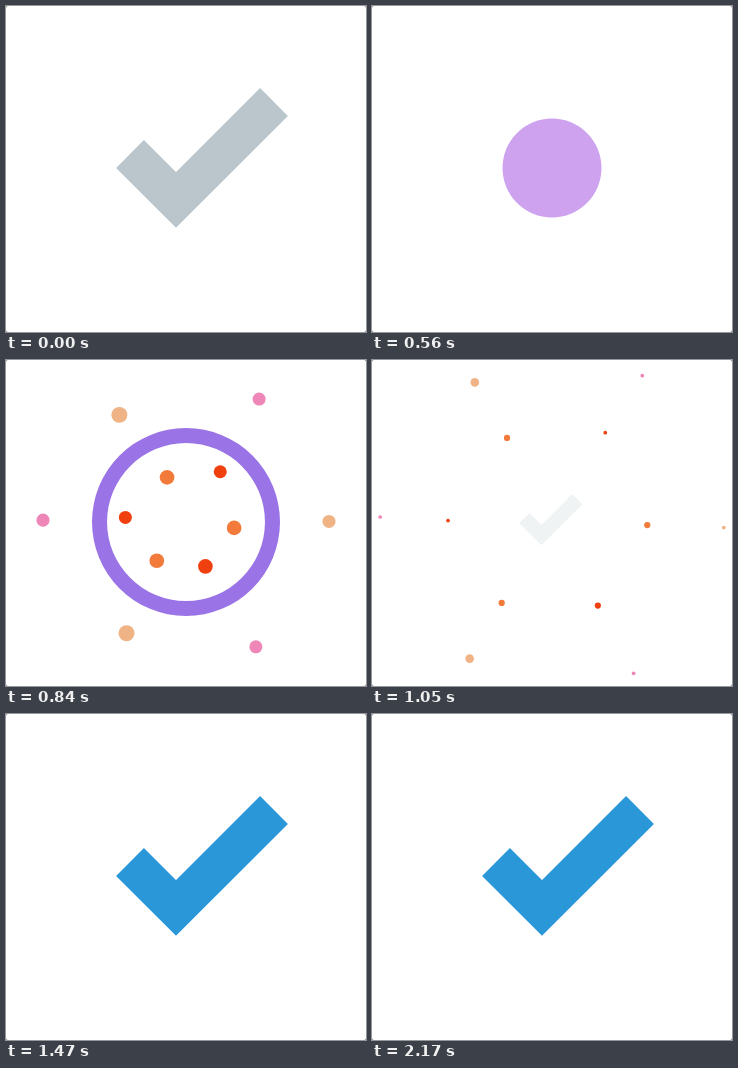
An HTML page with a canvas for the animation above (2240 ms loop, 360x326 px).

```html
<!DOCTYPE html>
<html lang="en">
<head>
<meta charset="utf-8">
<title>Check burst</title>
<style>
  html, body { margin: 0; width: 360px; height: 326px; overflow: hidden; background: #777; }
  canvas { display: block; background: #fff; border-radius: 2px; }
</style>
</head>
<body>
<canvas id="stage" width="360" height="326"></canvas>
<script>
const ctx = document.getElementById('stage').getContext('2d');
const LOOP = 2240, STEP = 70;
const CX = 180, CY = 162;
const CHECK_LENGTH = 203.5;
const GREY = '#bac6cc', PALE = '#eff3f4', BLUE = '#2a97d9';

// Four triplets of dots; near ones start inside the ring, far ones at its rim.
// drift is the sideways offset of each flight line; delays are per dot.
const near = { from: 5.5, span: 107 }, far = { from: 106, span: 71.6 };
const triplets = [
  { color: '#ee87b7', path: far, heading: 66.2, drift: -13.6, delays: [0, 0, 0] },
  { color: '#f0b385', path: far, heading: 12.2, drift: -31, delays: [0, 100, 100] },
  { color: '#f1400f', path: near, heading: -64.1, drift: 8.9, delays: [0, 50, 0] },
  { color: '#f27a3a', path: near, heading: -3.5, drift: 8.9, delays: [50, 50, 50] }
];

// Progress from 0 to 1 over a time span.
const progress = (t, start, span) => Math.min(1, Math.max(0, (t - start) / span));
const easeOut = (t, start, span, power = 2) => 1 - (1 - progress(t, start, span)) ** power;
const easeIn = (t, start, span, power) => progress(t, start, span) ** power;

function disc(x, y, r, color) {
  ctx.fillStyle = color;
  ctx.beginPath();
  ctx.arc(x, y, r, 0, Math.PI * 2);
  ctx.fill();
}

function check(color, scale, ox, oy, part = 1) {
  if (scale <= 0 || part <= 0) return;
  ctx.save();
  ctx.translate(ox, oy);
  ctx.scale(scale, scale);
  ctx.translate(-ox, -oy);
  ctx.strokeStyle = color;
  ctx.lineWidth = 39.4;
  if (part < 1) ctx.setLineDash([CHECK_LENGTH * part, CHECK_LENGTH * 2]);
  ctx.beginPath();
  ctx.moveTo(124, 148);
  ctx.lineTo(170, 194);
  ctx.lineTo(268, 96);
  ctx.stroke();
  ctx.restore();
}

function ring(t) {
  const outer = 97 * easeOut(t, 500, 200) - 4 * easeOut(t, 700, 280);
  const inner = 94 * easeOut(t, 630, 350);
  if (outer <= inner) return;
  const k = (t - 700) / 140;
  ctx.fillStyle = `rgb(${180 - 26 * k}, ${139 - 23 * k}, ${234 - 4 * k})`;
  ctx.beginPath();
  ctx.arc(CX, CY, outer, 0, Math.PI * 2);
  ctx.moveTo(CX + inner, CY);
  ctx.arc(CX, CY, inner, 0, Math.PI * 2, true);
  ctx.fill();
}

function burst(t) {
  for (const { color, path, heading, drift, delays } of triplets) {
    delays.forEach((delay, i) => {
      const age = t - delay;
      if (age < 700) return;
      const d = path.from + path.span * easeOut(age, 630, 490, 1.3);
      const a = (heading + 120 * i) * Math.PI / 180 + drift / d;
      const r = 8.3 * (1 - easeIn(age, 700, 420, 1.4));
      disc(CX + d * Math.cos(a), CY + d * Math.sin(a), r, color);
    });
  }
}

function draw(t) {
  ctx.clearRect(0, 0, 360, 326);
  check(GREY, 1 - easeIn(t, 350, 240, 1.5), 197, 162);
  burst(t);
  ring(t);
  const scale = easeOut(t, 980, 342);
  const part = easeOut(t, 1050, 350, 1.68);
  if (part < 1) check(PALE, scale, 169, 164);
  check(BLUE, scale, 169, 164, part);
}

const start = performance.now();
function tick() {
  const t = (performance.now() - start) % LOOP;
  draw(Math.floor(t / STEP) * STEP);
  requestAnimationFrame(tick);
}
tick();
</script>
</body>
</html>
```
